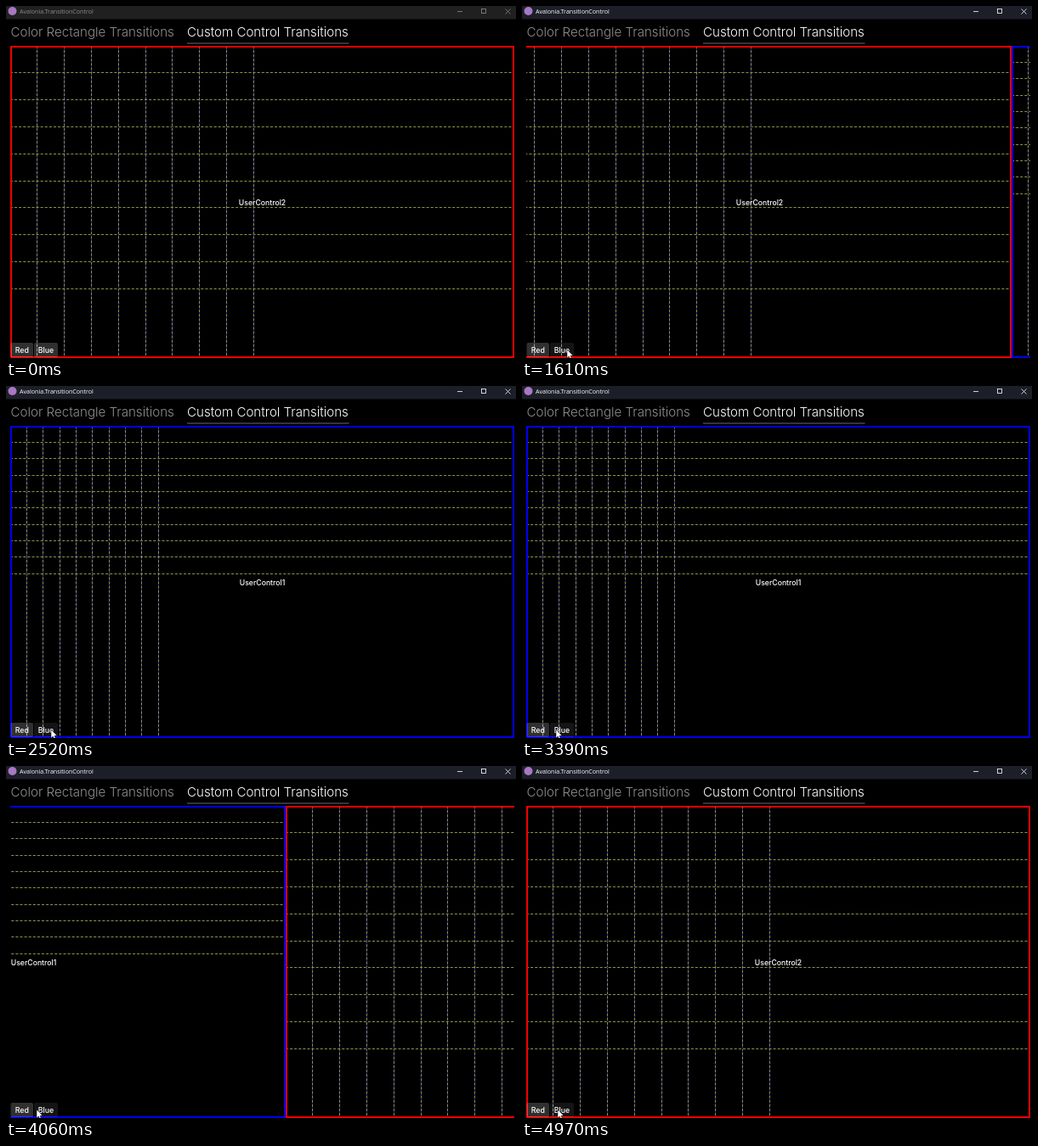
An HTML page with a canvas for the animation above (5000 ms loop, 600 by 415 pixels).

```html
<!DOCTYPE html>
<html lang="en">
<head>
<meta charset="utf-8">
<title>Transition control</title>
<style>
html, body { margin: 0; width: 100%; height: 100%; overflow: hidden; background: #000; }
canvas { display: block; }
</style>
</head>
<body>
<canvas id="stage" width="600" height="415"></canvas>
<script>
const ctx = document.getElementById('stage').getContext('2d');
const LOOP = 5000, SLIDE = 489, TO_BLUE = 1593, TO_RED = 3839, ACTIVATE = 1510;
const PANE = { x: 5, y: 47, w: 593, h: 368 };
const RED = { color: '#f00000', step: 31.83, label: 'UserControl2' };
const BLUE = { color: '#0000f0', step: 19.35, label: 'UserControl1' };
const INTER = 'Inter, sans-serif';

// Pointer path: time, x, y
const PATH = [
  [800, 96, 422], [1350, 53, 405], [3000, 53, 405], [3390, 40, 405],
  [3640, 20, 405], [3860, 20, 405], [4060, 36, 405], [4300, 42, 405], [5000, 42, 405]
];

const clamp = v => Math.max(0, Math.min(1, v));
const snap = v => Math.floor(v) + .5;

function text(str, x, y, font, color, align = 'left') {
  ctx.font = font;
  ctx.fillStyle = color;
  ctx.textAlign = align;
  ctx.fillText(str, x, y);
}

function line(points, color, width = 1) {
  ctx.beginPath();
  points.forEach(([x, y]) => ctx.lineTo(x, y));
  ctx.strokeStyle = color;
  ctx.lineWidth = width;
  ctx.stroke();
}

function gridLine(from, to, yellow, blue) {
  line([from, to], blue);
  ctx.setLineDash([2.95, 2.15]);
  line([from, to], yellow);
  ctx.setLineDash([]);
}

function pane({ color, step, label }, shift) {
  const { x, y, w, h } = PANE;
  ctx.save();
  ctx.beginPath();
  ctx.rect(x, y, w, h);
  ctx.clip();
  ctx.translate(Math.round(shift), 0);
  ctx.fillStyle = '#000';
  ctx.fillRect(x, y, w, h);
  for (let i = 1; i < 10; i++) {
    const gx = snap(x + i * step), gy = snap(y + i * step);
    gridLine([x, gy], [x + w, gy], '#94943c', '#08081c');
    gridLine([gx, y], [gx, y + h], '#94944c', '#1c1c90');
  }
  ctx.strokeStyle = color;
  ctx.lineWidth = 2;
  ctx.strokeRect(x + 1, y + 1, w - 2, h - 2);
  text(label, 301.5, 234.7, '500 8.7px ' + INTER, '#fff', 'center');
  ctx.restore();
}

function panes(t) {
  const back = t >= TO_RED;
  const [from, to] = back ? [BLUE, RED] : [RED, BLUE];
  const offset = PANE.w * clamp((t - (back ? TO_RED : TO_BLUE)) / SLIDE);
  if (offset < PANE.w) pane(from, -offset);
  if (offset > 0) pane(to, PANE.w - offset);
}

function titleBar(active) {
  ctx.fillStyle = active ? '#1c1e28' : '#202021';
  ctx.fillRect(0, 0, 600, 15.5);
  ctx.fillStyle = '#a878c4';
  ctx.beginPath();
  ctx.arc(7.5, 6, 5, 0, 7);
  ctx.fill();
  const ink = active ? '#fff' : '#8c8c8c';
  text('Avalonia.TransitionControl', 16, 9, '7.1px "Open Sans", sans-serif', ink);
  line([[531, 6.5], [537, 6.5]], ink, .8);
  ctx.strokeRect(559.5, 3.5, 5, 5);
  line([[587.5, 3.5], [593.5, 9.5]], ink, .8);
  line([[593.5, 3.5], [587.5, 9.5]], ink, .8);
}

function tabs() {
  const font = '300 15.1px ' + INTER;
  text('Color Rectangle Transitions', 5.5, 36.3, font, '#8f8f8f');
  text('Custom Control Transitions', 213, 36.3, font, '#fff');
  line([[213, 44], [403.5, 44]], '#6a6a6a');
}

function button(label, x, w, hover) {
  ctx.fillStyle = `rgba(255,255,255,${hover ? .08 : .19})`;
  ctx.beginPath();
  ctx.roundRect(x, 397, w, 17, 2);
  ctx.fill();
  text(label, x + w / 2, 409, '500 8.8px ' + INTER, '#fff', 'center');
}

function pointerAt(t) {
  const i = PATH.findIndex(p => p[0] > t);
  if (i < 1) return null;
  const [a, b] = [PATH[i - 1], PATH[i]];
  const k = clamp((t - a[0]) / (b[0] - a[0]));
  const ease = k * k * (3 - 2 * k);
  return { x: a[1] + (b[1] - a[1]) * ease, y: a[2] + (b[2] - a[2]) * ease };
}

function pointer({ x, y }) {
  ctx.save();
  ctx.translate(x, y);
  ctx.beginPath();
  [[0, 0], [0, 10], [2.3, 8], [3.8, 11.3], [5.4, 10.6], [4, 7.4], [7, 7.1]]
    .forEach(p => ctx.lineTo(...p));
  ctx.closePath();
  ctx.fillStyle = '#fff';
  ctx.fill();
  ctx.strokeStyle = '#000';
  ctx.lineWidth = .5;
  ctx.stroke();
  ctx.restore();
}

function draw(t) {
  ctx.fillStyle = '#000';
  ctx.fillRect(0, 0, 600, 415);
  titleBar(t >= ACTIVATE);
  tabs();
  panes(t);
  const p = pointerAt(t);
  const over = (x, w) => p && p.x >= x && p.x < x + w && p.y > 397 && p.y < 414;
  button('Red', 5.5, 26.5, over(5.5, 26.5));
  button('Blue', 33, 28, over(33, 28));
  if (p) pointer(p);
}

const start = performance.now();
function tick() {
  draw((performance.now() - start) % LOOP);
  requestAnimationFrame(tick);
}
tick();
</script>
</body>
</html>
```
